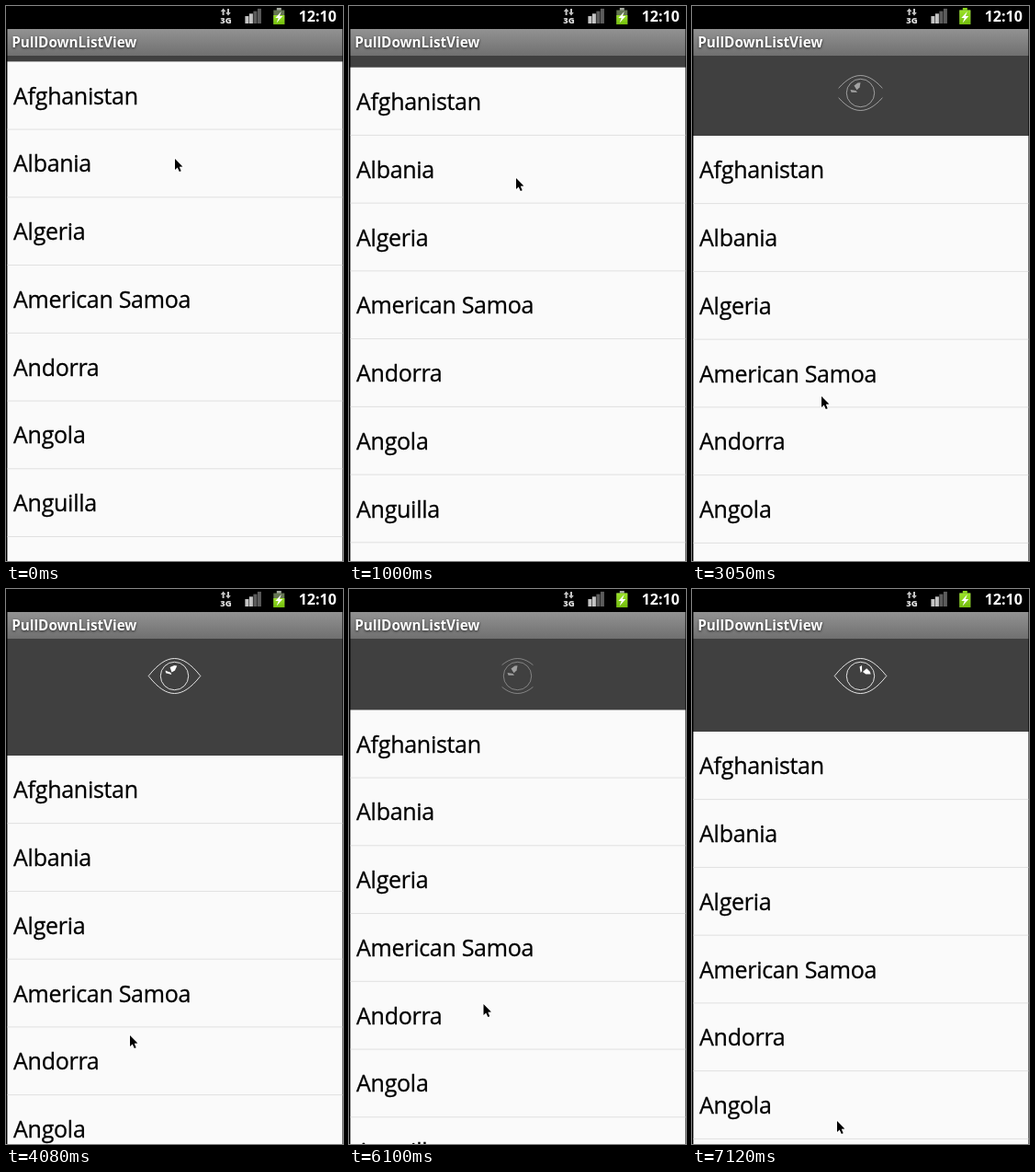
Animation of 367 by 603 pixels, one loop 8 s. Source, as an HTML page with a canvas:

```html
<!DOCTYPE html>
<html lang="en">
<head>
<meta charset="utf-8">
<title>Pull down list</title>
<style>
html, body { margin: 0; width: 100%; height: 100%; overflow: hidden; background: #000; }
canvas { display: block; width: 367px; height: 603px; }
</style>
</head>
<body>
<canvas id="stage" width="367" height="603"></canvas>
<script>
const W = 367, H = 603, LOOP = 8000, STEP = 1017, ROW = 73.75;
const LEFT = 1.5, INNER = W - 2.1;
const SANS = '"Open Sans", "Noto Sans", sans-serif';
const ctx = document.getElementById('stage').getContext('2d');
const countries = ['Afghanistan', 'Albania', 'Algeria', 'American Samoa',
  'Andorra', 'Angola', 'Anguilla', 'Antarctica'];

// Turning points of the drag: top edge of the list and pointer tip.
const drag = [
  { step: 0, top: 60.4, x: 184, y: 166 },
  { step: 1, top: 66.7, x: 182, y: 187 },
  { step: 2, top: 98, x: 164, y: 292 },
  { step: 3, top: 141, x: 141, y: 424 },
  { step: 4, top: 181, x: 135, y: 485 },
  { step: 5, top: 107.8, x: 135, y: 324 },
  { step: 7, top: 155, x: 158, y: 578 }
];

function dragAt(step) {
  const next = Math.max(1, drag.findIndex(p => p.step >= step));
  const a = drag[next - 1], b = drag[next];
  const u = (step - a.step) / (b.step - a.step);
  const mix = key => a[key] + (b[key] - a[key]) * u;
  return { top: mix('top'), x: mix('x'), y: mix('y') };
}

function rect(color, x, y, w, h) {
  ctx.fillStyle = color;
  ctx.fillRect(x, y, w, h);
}

function trace(points) {
  ctx.beginPath();
  points.forEach(([x, y]) => ctx.lineTo(x, y));
  ctx.closePath();
}

function polygon(color, ...points) {
  ctx.fillStyle = color;
  trace(points);
  ctx.fill();
}

function text(str, x, y, size, color, weight = 400) {
  ctx.font = `${weight} ${size}px ${SANS}`;
  ctx.fillStyle = color;
  ctx.fillText(str, x, y);
}

function gradient(y0, y1, from, to) {
  const g = ctx.createLinearGradient(0, y0, 0, y1);
  g.addColorStop(0, from);
  g.addColorStop(1, to);
  return g;
}

function drawBattery(charge) {
  const y = charge ? 4.5 : 10;
  rect(charge === 2 ? '#8bd71b' : '#a5aaa0', 294.8, 2, 5, 3);
  rect('#657553', 291.3, 4.5, 12, 15.5);
  rect(gradient(y, 20, '#9be329', '#72bc0c'), 291.3, y, 12, 20 - y);
  polygon('#fff', [299.8, 6], [293.3, 13], [296.7, 13], [294.6, 18.5], [301.3, 11], [297.9, 11]);
}

function drawArrow(x, y, dir) {
  ctx.save();
  ctx.translate(x, y);
  ctx.scale(1, dir);
  polygon('#c4c4c4', [0, -4], [2.8, -.6], [1, -.6], [1, 3.6], [-1, 3.6], [-1, -.6], [-2.8, -.6]);
  ctx.restore();
}

function drawStatus(charge) {
  rect('#000', 0, 0, W, 25);
  drawArrow(236.6, 6.5, 1);
  drawArrow(242, 6.5, -1);
  text('3G', 233.2, 19, 9.4, '#ddd', 800);
  for (let i = 0; i < 4; i++) {
    const h = 8 + i * 2.7;
    rect(i < 2 ? '#c4c4c4' : '#5c5c5c', 260.4 + i * 4.5, 19 - h, 4, h);
  }
  drawBattery(charge);
  text('12:10', 318.7, 17, 16, '#fff', 700);
}

function drawTitle() {
  rect(gradient(25, 54, '#929292', '#707070'), LEFT, 25, INNER, 29);
  ctx.save();
  ctx.shadowColor = 'rgba(0,0,0,.73)';
  ctx.shadowBlur = 3;
  ctx.shadowOffsetY = 1;
  text('PullDownListView', 6.2, 45, 15.25, '#fff', 700);
  ctx.restore();
}

// The eye opens as the list is pulled down, then lights up and rolls.
function drawEye(top, step) {
  const open = Math.min(1, Math.max(0, (top - 108) / 47));
  const ready = open === 1;
  const reach = 34 * open;
  ctx.save();
  ctx.translate(183.5, 94.5);
  ctx.strokeStyle = `rgba(255,255,255,${ready ? .85 : .7 * open})`;
  ctx.lineWidth = 1;
  ctx.beginPath();
  ctx.arc(0, 0, 15.2, 0, Math.PI * 2);
  ctx.stroke();

  ctx.save();
  ctx.beginPath();
  ctx.rect(-reach, -22, reach * 2, 44);
  ctx.clip();
  ctx.beginPath();
  for (const s of [-1, 1]) {
    ctx.moveTo(-28.3, 0);
    ctx.bezierCurveTo(-18, s * 13, -9, s * 19, 0, s * 19);
    ctx.bezierCurveTo(9, s * 19, 18, s * 13, 28.3, 0);
  }
  ctx.stroke();
  ctx.restore();

  if (ready) ctx.rotate((22 * step - 74) * Math.PI / 180);
  const shine = `rgba(255,255,255,${ready ? 1 : .45 + .1 * open})`;
  polygon(shine, [-7, -8], [-3, -11], [0, -11.3], [-1, -6], [-4, -3.2]);
  polygon(shine, [-11, -3.5], [-8, -3], [-5, -2.5], [-3.5, -.8], [-10, -.8]);
  ctx.restore();
}

function drawList(top) {
  rect('#fafafa', LEFT, top, INNER, H - top);
  ctx.save();
  ctx.letterSpacing = '-0.3px';
  ctx.strokeStyle = '#000';
  ctx.lineWidth = .3;
  countries.forEach((name, i) => {
    const y = top + i * ROW;
    text(name, 8.1, y + 46.3, 25, '#000');
    ctx.strokeText(name, 8.1, y + 46.3);
    rect('#e0e0e0', LEFT, y + ROW - .6, INNER, 1);
  });
  ctx.restore();
}

function drawPointer(x, y) {
  ctx.save();
  ctx.translate(x, y);
  trace([[0, 0], [0, 12], [2.7, 9.5], [4.8, 14], [6.7, 13.2], [4.8, 8.8], [8.4, 8.5]]);
  ctx.strokeStyle = '#fff';
  ctx.lineWidth = 1.4;
  ctx.stroke();
  ctx.fillStyle = '#000';
  ctx.fill();
  ctx.restore();
}

function draw(now) {
  const step = Math.min(7, Math.floor((now % LOOP + 20) / STEP));
  const { top, x, y } = dragAt(step);
  rect('#000', 0, 0, W, H);
  drawStatus(Math.max(0, step % 4 - 1));
  drawTitle();
  rect('#404040', LEFT, 54, INNER, H - 54);
  drawEye(top, step);
  drawList(top);
  drawPointer(x, y);
}

const start = performance.now();
function tick() {
  draw(performance.now() - start);
  requestAnimationFrame(tick);
}
tick();
</script>
</body>
</html>
```
